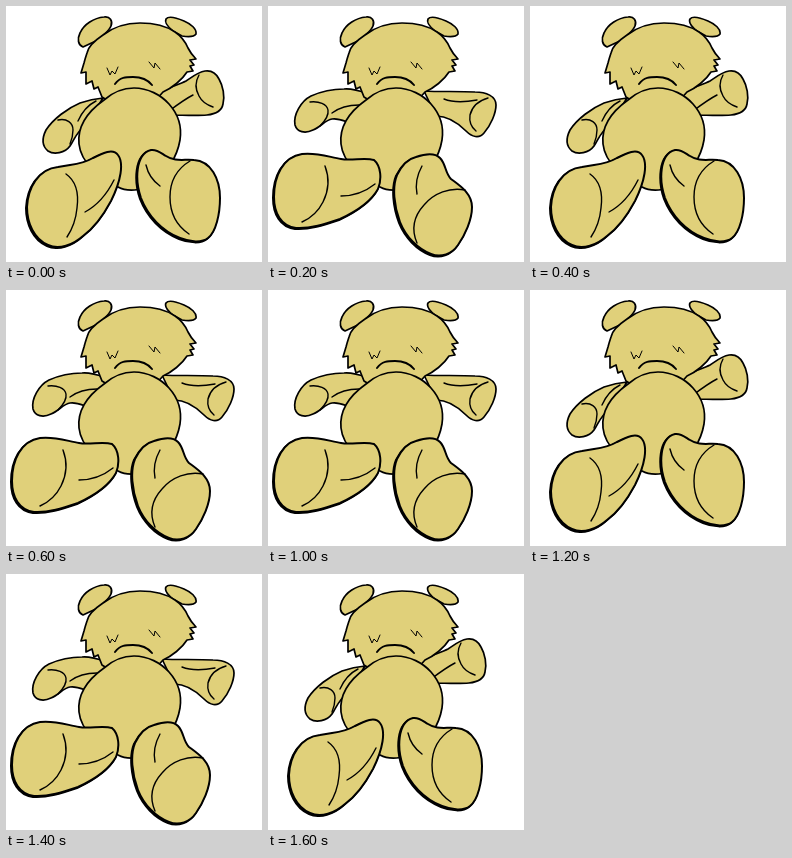
Write an HTML page that moves like this. It is 256 px wide and 256 px high and loops after 1800 ms.

```html
<!DOCTYPE html>
<html lang="en">
<head>
<meta charset="utf-8">
<title>Teddy bear</title>
<style>
  html, body { margin: 0; width: 100%; height: 100%; overflow: hidden; background: #fff; }
  svg { display: block; width: 100vw; height: 100vh; }
  path { stroke: #000; stroke-linecap: round; stroke-linejoin: round; }
  .skin { fill: #e0d07a; stroke-width: 1.7; }
  .leg { fill: #e0d07a; stroke-width: 2; filter: drop-shadow(-.6px 1px 0 #000); }
  .line { fill: none; stroke-width: 1.4; }
  .mouth { fill: none; stroke-width: 2; }
  .thin { fill: none; stroke-width: 1; }
  .sit, .kick { animation: 1.8s step-end infinite; }
  .sit { animation-name: sit; }
  .kick { animation-name: kick; }
  @keyframes sit {
    0%, 22.22%, 44.44%, 66.66%, 88.88% { visibility: visible; }
    11.11%, 33.33%, 55.55%, 77.77% { visibility: hidden; }
  }
  @keyframes kick {
    0%, 22.22%, 44.44%, 66.66%, 88.88% { visibility: hidden; }
    11.11%, 33.33%, 55.55%, 77.77% { visibility: visible; }
  }
</style>
</head>
<body>
<svg viewBox="0 0 256 256">
  <defs>
    <g id="torso">
      <path class="skin" d="M77 41C72 39 71 33 74 27C78 18 88 12 98 11C104 10 107 15 105 20C103 25 98 28 94 33Z"/>
      <path class="skin" d="M167 25C162 21 158 17 160 13C163 9 171 12 178 15C185 18 191 23 190 28C188 31 182 31 176 30Z"/>
      <path class="skin" d="M78 57L75 67L80 66L80 78L86 75L88 83L92 81L96 91L104 96H148L157 86C166 82 176 74 181 66L187 65L184 60L188 59L184 54L190 53C186 49 184 46 182 42C179 35 175 30 169 26C159 19 147 17 134 17C119 17 106 22 97 29C88 35 82 41 81 47C80 50 79 53 78 57Z"/>
      <path class="skin" d="M98 94C106 87 116 82 128 82C142 82 155 89 163 98C172 108 176 121 174 134C171 152 160 168 146 178C136 185 121 186 112 181C94 173 75 157 73 138C71 119 84 104 98 94Z"/>
      <path class="mouth" d="M109 78C114 71 120 71 127 71C136 71 142 74 146 79"/>
      <path class="thin" d="M101 62L104 69L106 65L109 68L112 61M143 56L148 62L149 57L154 63"/>
    </g>
  </defs>

  <g class="sit">
    <path class="skin" d="M97 92C87 93 80 95 74 97C62 102 47 113 40 124C36 132 36 140 42 145C48 149 59 147 64 140C69 133 68 129 82 116Z"/>
    <path class="line" d="M52 114C61 112 67 117 67 124C67 129 66 133 64 138M90 95C82 99 76 106 72 115"/>
    <path class="skin" d="M146 90C158 83 172 79 180 75C186 71 192 66 199 65C206 64 210 67 213 73C217 80 219 90 217 98C216 104 210 108 201 109C190 110 176 109 162 109Z"/>
    <path class="line" d="M193 69C189 76 189 83 193 90C196 96 201 99 207 101M163 105C171 99 179 93 187 89"/>
    <use href="#torso"/>
    <path class="leg" d="M64 159C72 158 80 156 87 152C97 147 107 142 112 149C118 157 115 175 105 195C97 210 88 222 77 230C67 239 53 244 42 239C28 233 21 217 21 201C22 182 32 163 52 161Z"/>
    <path class="line" d="M60 168C70 175 73 187 71 202C70 213 67 222 61 231M108 174C101 188 92 199 79 206"/>
    <path class="leg" d="M145 144C151 143 155 147 160 150C169 156 178 153 188 154C205 155 214 173 214 192C214 208 210 226 202 232C196 237 184 236 174 232C156 225 142 210 135 192C129 175 129 148 145 144Z"/>
    <path class="line" d="M184 155C169 164 164 178 164 191C164 207 171 220 183 228M140 159C142 168 147 175 154 180"/>
  </g>

  <g class="kick">
    <path class="skin" d="M104 89C95 86 86 82 76 83C65 83 52 86 43 90C33 95 25 109 27 119C29 126 37 128 45 124C53 121 57 114 64 113C71 112 76 115 82 117Z"/>
    <path class="line" d="M42 96C51 95 59 98 60 104C61 110 57 115 52 120M64 107C72 101 80 99 91 99"/>
    <path class="skin" d="M156 85C171 86 191 85 207 86C218 86 228 90 228 99C228 107 223 119 216 127C211 133 204 131 198 125C190 117 180 110 168 110Z"/>
    <path class="line" d="M220 92C209 95 204 101 202 109C201 116 203 121 208 125M176 93C186 97 198 96 209 94"/>
    <use href="#torso"/>
    <path class="leg" d="M34 148C48 146 61 151 73 153C84 155 97 151 106 154C113 160 114 173 110 183C103 196 87 206 72 213C57 218 42 223 28 222C13 220 6 207 6 191C6 170 15 151 34 148Z"/>
    <path class="line" d="M57 160C62 173 60 186 55 196C50 206 43 212 34 216M73 190C84 190 97 186 107 178"/>
    <path class="leg" d="M148 151C157 148 167 147 172 152C178 158 177 167 183 173C191 179 204 187 204 201C204 214 197 229 190 239C184 248 173 252 163 248C150 243 138 231 132 216C126 200 124 181 129 169C133 161 139 153 148 151Z"/>
    <path class="line" d="M197 184C182 181 166 187 156 199C146 210 143 223 149 237M154 160C149 169 147 178 149 188"/>
  </g>
</svg>
</body>
</html>
```
